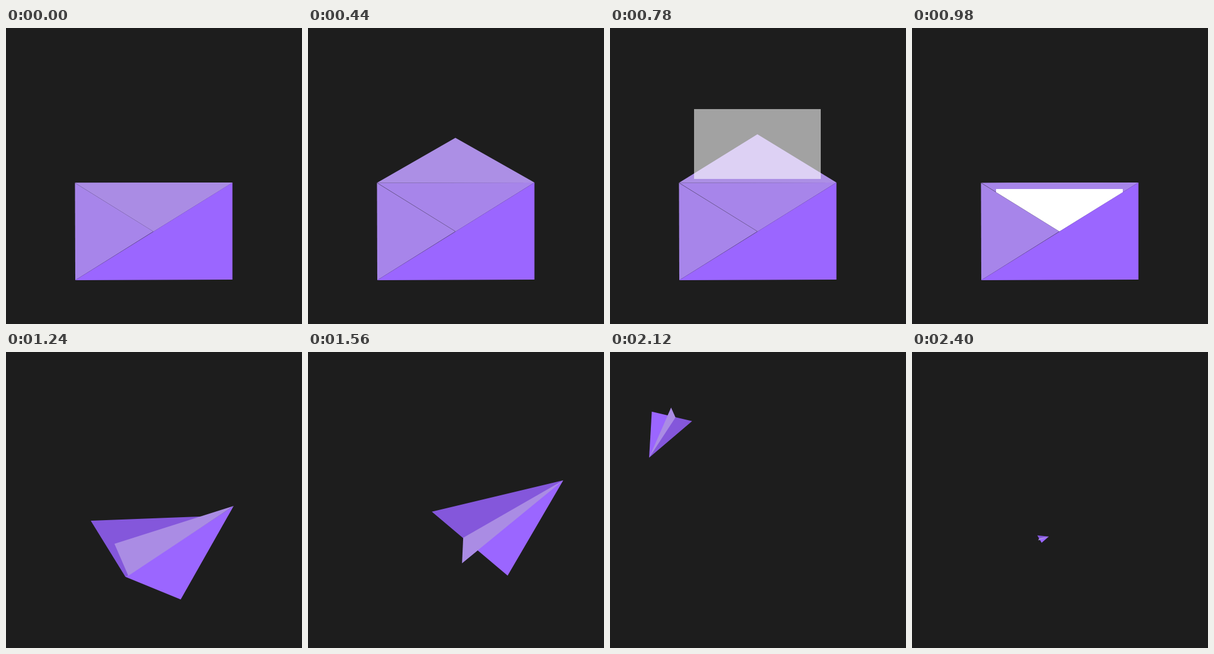
An HTML page for the animation above (2420 ms loop, 500x500 px).

```html
<!DOCTYPE html>
<html lang="en">
<head>
<meta charset="utf-8">
<title>Envelope to paper plane</title>
<style>
html, body { margin: 0; width: 100%; height: 100%; overflow: hidden; background: #1d1d1d; }
svg { display: block; width: 100vw; height: 100vh; }
</style>
</head>
<body>
<svg viewBox="0 0 500 500">
  <clipPath id="mouth"><path d="M0 0H500V261H382.5L249 343.5L116.5 261.5H0Z"/></clipPath>
  <path id="inside" d="M116.5 261.5L382.5 261L249 344Z" fill="#a785ea"/>
  <polygon id="dark"/>
  <polygon id="bright" fill="#9b66ff"/>
  <path id="seam" d="M116.5 261.5L249 343.5" stroke="#1d1d1d" stroke-width=".7" opacity=".5"/>
  <polygon id="back" fill="#ac8fe5"/>
  <g clip-path="url(#mouth)"><rect id="letter" x="142" width="214" height="118" fill="#fff"/></g>
  <polygon id="light" fill="#aa8ce4"/>
</svg>
<script>
const LOOP = 2420, FOLD = 1060, CREASED = 1240, PLANE = 1560;
const [inside, dark, bright, seam, back, letter, light] =
  ['inside', 'dark', 'bright', 'seam', 'back', 'letter', 'light'].map(id => document.getElementById(id));

// The same seven corners in each pose; the plane is relative to its centre
const envelope = {
  nose: [382.5, 261], left: [116.5, 261.5], keel: [117, 426], right: [382.5, 425],
  top: [116.5, 261.5], bottom: [249, 343.5], inner: [249, 343.5]
};
const creased = {
  nose: [384.5, 260], left: [143, 285], keel: [201.5, 380], right: [295, 418],
  top: [183, 324], bottom: [206.5, 378], inner: [345, 277.5]
};
const plane = {
  nose: [79, -54], left: [-143, -1], keel: [-79, 53], right: [-15, 107],
  top: [-90, 43], bottom: [-92, 86], inner: [79, -54]
};

const part = (t, a, b) => Math.min(1, Math.max(0, (t - a) / (b - a)));
const mix = (a, b, k) => a + (b - a) * k;
const smooth = k => k * k * (3 - 2 * k);
const mapPose = (pose, fn) =>
  Object.fromEntries(Object.entries(pose).map(([name, p]) => [name, fn(p, name)]));
const blend = (p, q, k) => mapPose(p, (a, name) => a.map((v, d) => mix(v, q[name][d], k)));

// Time travelled when speed rises evenly from 0 at a to 1 at b
const ramp = (t, a, b) => (b - a) * part(t, a, b) ** 2 / 2 + Math.max(0, t - b);

// The plane circles a slanted ellipse while it turns and shrinks
function flying(t) {
  const rad = Math.PI / 180;
  const angle = (-45 + 0.431 * ramp(t, 1463, 1849)) * rad;
  const cx = 234.5 + 178 * Math.cos(angle) + 30.4 * Math.sin(angle);
  const cy = 193.8 - 120.8 * Math.sin(angle);
  const size = 1 - Math.max(0, t - 1630) * 0.001186;
  const turn = -Math.max(0, t - 1688) * 0.478 * rad;
  const c = Math.cos(turn) * size, s = Math.sin(turn) * size;
  return mapPose(plane, ([x, y]) => [cx + x * c - y * s, cy + x * s + y * c]);
}

const poseAt = t => t < CREASED
  ? blend(envelope, creased, part(t, FOLD, CREASED))
  : blend(creased, flying(t), part(t, CREASED, PLANE));

const setPoints = (node, ...pts) =>
  node.setAttribute('points', pts.map(p => p.map(v => v.toFixed(2)).join()).join(' '));
const show = (node, on) => node.setAttribute('visibility', on ? 'visible' : 'hidden');

function draw(t) {
  const p = poseAt(t), closed = t < FOLD;
  const k = part(t, FOLD, 1200);
  setPoints(dark, p.left, p.keel, p.bottom, p.inner);
  setPoints(bright, p.nose, p.right, p.keel);
  dark.setAttribute('fill', `rgb(${mix(167, 132, k)},${mix(133, 87, k)},${mix(234, 219, k)})`);
  show(inside, closed);
  show(seam, closed);

  const open = (1 - (1 - part(t, 60, 600)) ** 2.7) * (1 - smooth(part(t, 900, FOLD)));
  const apex = mix(343.5, 179.5, open);
  const raised = apex < 261.5;
  for (const flap of [back, light]) setPoints(flap, p.nose, p.top, closed ? [249, apex] : p.bottom);
  show(back, raised);
  show(light, !raised);

  show(letter, closed && t > 640);
  letter.setAttribute('y', mix(0, 272, part(t, 640, 920)));
  letter.setAttribute('opacity', part(t, 640, 880));
}

const began = performance.now();
function tick() {
  draw((performance.now() - began) % LOOP);
  requestAnimationFrame(tick);
}
draw(0);
requestAnimationFrame(tick);
</script>
</body>
</html>
```
